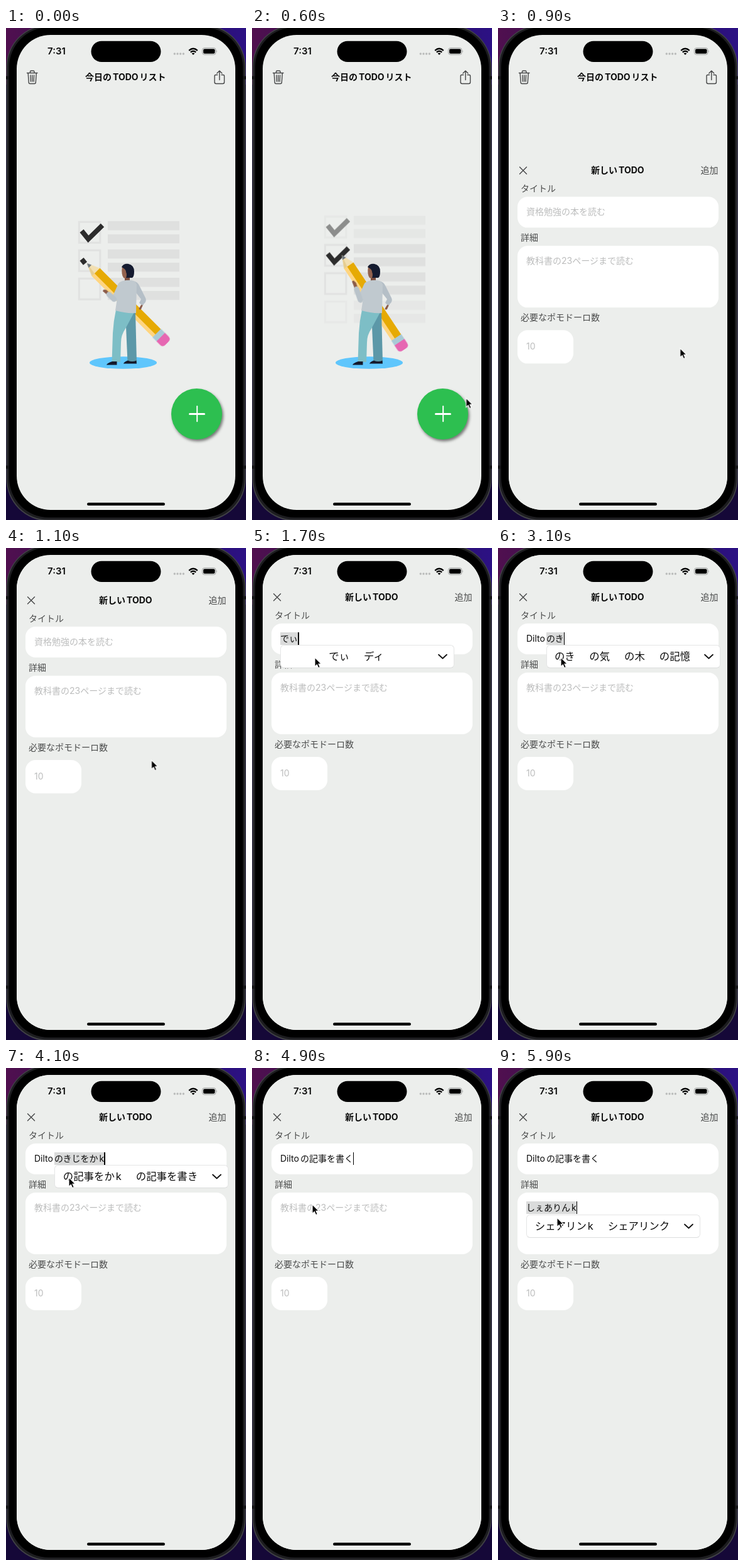
Recreate the animation shown at these times as an HTML page. Size 382 by 782 pixels, loop 6000 ms.

```html
<!DOCTYPE html>
<html lang="ja">
<head>
<meta charset="utf-8">
<title>TODO</title>
<style>
  html, body { margin: 0; width: 100%; height: 100%; overflow: hidden; background: #120732; }
  #stage { position: relative; width: 382px; height: 782px; overflow: hidden;
    font: 14px/20px Inter, "Noto Sans CJK JP", "Noto Sans CJK", sans-serif; color: #0c0c0c; }
  #stage svg { position: absolute; left: 0; top: 0; overflow: visible; }
  .screen { position: absolute; inset: 0; background: #eceeec;
    clip-path: inset(11px 17px 16px 17px round 54px); }
  .t { position: absolute; margin-top: -10px; white-space: nowrap; }
  .t i, .popup i { display: inline-block; width: 2px; }
  .head { font-weight: 700; }
  .label { left: 36px; color: #4b4c4c; }
  .hint { left: 45px; color: #bcbdbd; }
  .box { position: absolute; left: 31px; width: 320px; border-radius: 16px; background: #fff; }
  .line { fill: none; stroke: #454647; stroke-width: 1.4; stroke-linecap: round; stroke-linejoin: round; }

  .plus { position: absolute; left: 263px; top: 573px; width: 81px; height: 81px; border-radius: 50%;
    background: #2dbf50; box-shadow: 2px 3px 4px rgba(0, 0, 0, .5); }
  .plus::before, .plus::after { content: ""; position: absolute; left: 27.5px; top: 39.3px;
    width: 26px; height: 2.4px; border-radius: 2px; background: #fff; }
  .plus::after { transform: rotate(90deg); }

  .input { left: 45px; }
  .comp { display: inline-block; background: #dadbdb; vertical-align: top; }
  .caret { display: inline-block; width: 1.5px; height: 20px; margin-right: -2px;
    background: #000; vertical-align: top; }
  .popup { position: absolute; box-sizing: border-box; width: 276.5px; height: 37px; border-radius: 6px;
    border: 1px solid #e4e5e5; border-bottom-color: #dcdddd; background: #fff; font-size: 16.4px; }
  .words { position: absolute; left: 0; top: 7px; width: 240px; display: flex; gap: 23px;
    justify-content: center; white-space: nowrap; }
  .words.one { left: 21px; justify-content: flex-start; }

  .modal, .cursor, .rows, .out, .in, .draw, .pencil, .arm { animation: 6s linear infinite; }
  .modal { position: absolute; left: 0; top: 11px; width: 382px; height: 771px; background: #eceeec;
    animation-name: rise; }
  .modal > div { position: absolute; left: 0; top: -11px; }
  .cursor { animation-name: point; }
  .rows { animation-name: scroll; }
  .out { animation-name: out; }
  .in { animation-name: in; }
  .draw { animation-name: draw; stroke-dasharray: 1 2; }
  .pencil { animation-name: write; }
  .arm { animation-name: reach; }

  /* critically damped spring */
  @keyframes rise {
    0%, 12.5% { transform: translateY(755px); }
    13.33% { transform: translateY(556px); }
    14.17% { transform: translateY(306px); }
    15% { transform: translateY(150px); }
    15.83% { transform: translateY(69px); }
    16.67% { transform: translateY(30px); }
    17.5% { transform: translateY(13px); }
    18.33% { transform: translateY(5px); }
    20%, 100% { transform: none; }
  }
  @keyframes point {
    0%, 8.3% { transform: translate(372px, 574px); opacity: 0; }
    8.31% { transform: translate(372px, 574px); opacity: 1; }
    10% { transform: translate(341px, 588px); }
    11.67%, 13.33% { transform: translate(314px, 610px); }
    16.67% { transform: translate(266px, 410px); }
    18.33% { transform: translate(232px, 338px); }
    21.67% { transform: translate(140px, 190px); }
    23.33%, 25% { transform: translate(104px, 152px); }
    28.33%, 78.33% { transform: translate(100px, 174px); }
    83.33%, 100% { transform: translate(94px, 238px); opacity: 1; }
  }
  @keyframes scroll {
    0%, 8% { transform: none; animation-timing-function: ease-in-out; }
    14.67%, 100% { transform: translateY(-45px); }
  }
  @keyframes out { 0%, 8% { opacity: 1; } 12%, 100% { opacity: 0; } }
  @keyframes in { 0%, 8% { opacity: 0; } 12%, 100% { opacity: 1; } }
  @keyframes draw {
    0% { stroke-dashoffset: .82; }
    1.67% { stroke-dashoffset: .66; }
    5.83%, 100% { stroke-dashoffset: 0; }
  }
  @keyframes write {
    0% { transform: rotate(45deg); }
    1.67% { transform: rotate(43.2deg) translateX(7px); }
    5.83%, 7.5% { transform: rotate(62deg) translateX(3px); }
    10% { transform: rotate(56.5deg) translateX(-1px); }
    13.33%, 100% { transform: rotate(45deg) translateX(-9px); }
  }
  @keyframes reach {
    0% { transform: rotate(223deg); }
    1.67% { transform: rotate(220deg) scaleX(.95); }
    5.83%, 7.5% { transform: rotate(257deg) scaleX(1.4); }
    10% { transform: rotate(251deg) scaleX(1.4); }
    13.33%, 100% { transform: rotate(224deg) scaleX(1.1); }
  }
</style>
</head>
<body>
<div id="stage">
  <svg width="382" height="782">
    <defs>
      <linearGradient id="wall">
        <stop offset="0" stop-color="#50104f"/><stop offset=".5" stop-color="#2a0c55"/><stop offset="1" stop-color="#2c1184"/>
      </linearGradient>
    </defs>
    <rect width="382" height="782" fill="#150838"/>
    <rect width="382" height="90" fill="url(#wall)"/>
    <rect x=".5" y="-5" width="381" height="788.5" rx="67" fill="#424347"/>
    <rect x="2" y="-3.5" width="378" height="785" rx="65" fill="#1d1d20"/>
    <rect x="5" y="-1" width="372" height="779" rx="63"/>
    <path d="M0 79h5M0 698h5M377 79h5M377 698h5" stroke="#141416" stroke-width="5"/>
  </svg>

  <div class="screen">
    <svg width="382" height="782">
      <g class="line">
        <path d="M33.5 71.5H50M38.5 71v-1.5q0-1.5 1.5-1.5h3.5q1.5 0 1.5 1.5V71M35.2 72l1 14.5q.1 2 2 2h7.1q1.9 0 2-2l1-14.5M39 75l.4 10M41.8 75v10M44.6 75l-.4 10"/>
        <path d="M336.5 74.5h-2.5q-2 0-2 2v9.5q0 2.5 2.5 2.5h10.5q2.5 0 2.5-2.5v-9.5q0-2-2-2h-2.5M339.8 82.5V68M335.8 72l4-4 4 4"/>
      </g>
      <defs>
        <g id="row">
          <rect x="116.3" y="308.3" width="33.5" height="33" fill="none" stroke="#e1e2e1" stroke-width="3"/>
          <path d="M162 307h114v14.5H162zM162 328h114v14.3H162z" fill="#dfe0df"/>
        </g>
        <path id="tick" d="M120.5 322.5L131 335.5 153.5 313.5" pathLength="1" fill="none" stroke="#2c2c2c" stroke-width="7.8"/>
      </defs>
      <g class="rows">
        <g class="out"><use href="#row"/><use href="#tick"/></g>
        <use href="#row" y="45"/>
        <use href="#tick" y="45" class="draw"/>
        <use href="#row" y="90"/>
        <g class="in"><use href="#row" y="135"/></g>
      </g>
      <ellipse cx="186.5" cy="532" rx="53.5" ry="9.8" fill="#5fc6fc"/>
      <g transform="translate(196 441)">
        <g class="pencil">
          <path d="M-95 0L-75-9V9z" fill="#f2dfb2"/>
          <path d="M-95 0L-75 3V9z" fill="#e6cd90"/>
          <path d="M-95 0l7-3.2v6.4z" fill="#6c757c"/>
          <path d="M-75-9H62V3H-75z" fill="#e6aa04"/>
          <path d="M-75 3H62V9H-75z" fill="#ffd580"/>
          <path d="M62-9.5h9v19h-9z" fill="#a9cad6"/>
          <path d="M71-9.5h8q6 0 6 6v7q0 6-6 6h-8z" fill="#e667b2"/>
        </g>
      </g>
      <path d="M190 452L206 451 208 531H193.5z" fill="#5c98a8"/>
      <path d="M175 448L204 452 190 478Q183 488 183 500L182 531H168.5L170 485Q171 466 175 448z" fill="#7dbec6"/>
      <path d="M169 530h7.5v5.5H160q1-3 9-5.5zM194 528.5q7 3 13.5 0l.5 5H187q1-3 7-5z" fill="#14192b"/>
      <path d="M217 437l2 1-4 9q-3 2-3.5-1z" fill="#8b5b49"/>
      <path d="M202 402q8 1 11 9l9 18q2 4-1 8l-4 4-5-4 3-6-11-14z" fill="#b5bfc7"/>
      <path d="M189 394h8v9q-4 3-8 0z" fill="#7c4f40"/>
      <path d="M180 405q7-5 19-4 8 1 9 7l-1 45q-16 1-33-4l4-26z" fill="#c0c9cf"/>
      <path d="M185 379q8-5 10 2l-1 14q-3 4-7 2-4-6-2-18z" fill="#93624e"/>
      <path d="M184 380q3-6 11-5 9 2 9 12 0 8-3 10h-10q2-5 0-9 0-5-7-8z" fill="#151b30"/>
      <path d="M183 409L174 429" fill="none" stroke="#c0c9cf" stroke-width="10" stroke-linecap="round"/>
      <g transform="translate(172 431)">
        <g class="arm">
          <path d="M14-2.5L22-3 22.5 0 19 2.5H14z" fill="#8b5b49"/>
          <path d="M0 0H11" stroke="#b9c3ca" stroke-width="8.5" stroke-linecap="round"/>
        </g>
      </g>
    </svg>
    <div class="t head" style="left:126px;top:78px">今日のTODOリスト</div>
    <div class="plus"></div>

    <div class="modal"><div>
      <svg width="382" height="782">
        <path class="line" d="M34.5 72.7L45.5 83.7M45.5 72.7L34.5 83.7"/>
      </svg>
      <div class="t head" style="left:148px;top:78px">新しいTODO</div>
      <div class="t" style="left:322.5px;top:78px;color:#4b4c4c">追加</div>
      <div class="t label" style="top:107px">タイトル</div>
      <div class="box" style="top:120px;height:49px"></div>
      <div class="t label" style="top:185px">詳細</div>
      <div class="box" style="top:198px;height:97.5px"></div>
      <div class="t label" style="top:312px">必要なポモドーロ数</div>
      <div class="box" style="top:332px;height:53px;width:89px"></div>
      <div class="t hint" style="top:143.5px">資格勉強の本を読む</div>
      <div class="t hint" style="top:221.5px">教科書の23ページまで読む</div>
      <div class="t hint" style="top:358px">10</div>
      <div class="t input" style="top:144px"></div>
      <div class="t input" style="top:222px"></div>
      <div class="popup" hidden>
        <div class="words"></div>
        <svg width="276" height="36"><path d="M251 14.5l6.5 6 6.5-6" fill="none" stroke="#111" stroke-width="1.8" stroke-linecap="round" stroke-linejoin="round"/></svg>
      </div>
    </div></div>
  </div>

  <svg width="382" height="782">
    <rect x="135.5" y="20.7" width="111" height="33.3" rx="16.6"/>
    <g fill="#b9bbba"><circle cx="268.3" cy="41" r="1.7"/><circle cx="273" cy="41" r="1.7"/><circle cx="277.7" cy="41" r="1.7"/><circle cx="282.4" cy="41" r="1.7"/></g>
    <path d="M291.2 35.8q6.8-6 13.6 0M293.8 38.6q4.2-3.6 8.4 0" fill="none" stroke="#000" stroke-width="2.3"/>
    <path d="M295.6 40.4q2.4-2 4.8 0L298 42.8z"/>
    <rect x="312.5" y="31.7" width="21.5" height="10.6" rx="3.3" fill="none" stroke="#9c9e9d"/>
    <rect x="314" y="33.2" width="18.5" height="7.6" rx="2"/>
    <path d="M335.2 35.3q1.6 1.7 0 3.4z" fill="#9c9e9d"/>
    <rect x="129" y="754.5" width="124" height="4.5" rx="2.25"/>
  </svg>
  <div class="t" style="left:66px;top:37px;font-size:15px;font-weight:600">7:31</div>
  <svg width="382" height="782">
    <g class="cursor">
      <path d="M0 0V14.5L3.4 11.4 5.7 16.6 8.3 15.5 6 10.4H10.4z" stroke="#fff" stroke-width="1.1"/>
    </g>
  </svg>
</div>

<script>
  const $$ = q => [...document.querySelectorAll(q)];
  const inputs = $$('.input'), hints = $$('.hint');
  const [modal] = $$('.modal'), [popup] = $$('.popup'), [words] = $$('.words');
  const clock = modal.getAnimations()[0];
  const LEAD = 50; // switch early enough that each state is on screen at its time

  // thin gap where Latin letters meet kana or kanji
  const space = s => s.replace(/(?<=[A-Za-z])(?=[^\w\s])|(?<=[^\w\s])(?=[A-Za-z])/g, '<i></i>');
  $$('.head').forEach(el => el.innerHTML = space(el.textContent));

  const name = 'Dilto', title = name + 'の記事を書く';
  // [time, field, committed text, text being composed, candidates]
  const steps = [
    [0, -1, '', '', ''],
    [1500, 0, '', '', ''],
    [1600, 0, '', 'd', ''],
    [1700, 0, '', 'でぃ', 'でぃ ディ'],
    [1800, 0, '', 'でぃr', 'でぃr ディr'],
    [1900, 0, '', 'でぃる', 'でぃる ディル'],
    [2100, 0, '', 'でぃるt', 'でぃるt ディルt'],
    [2200, 0, '', 'でぃると', name],
    [2400, 0, '', name, name],
    [2600, 0, name, '', ''],
    [2900, 0, name, 'n', ''],
    [3000, 0, name, 'の', 'の 野 ノ 之'],
    [3100, 0, name, 'のき', 'のき の気 の木 の記憶'],
    [3300, 0, name, 'のきj', 'の木j の気j'],
    [3500, 0, name, 'のきじ', 'の記事 の生地'],
    [3600, 0, name, 'のきじw', 'の記事w の生地w'],
    [3700, 0, name, 'のきじを', 'の記事を の生地を'],
    [3900, 0, name, 'のきじをk', 'の記事をk の生地をk'],
    [4000, 0, name, 'のきじをか', 'の記事をか の記事を書き'],
    [4100, 0, name, 'のきじをかk', 'の記事をかk の記事を書き'],
    [4200, 0, name, 'のきじをかく', 'の記事を書く の記事を描く'],
    [4500, 0, name, 'の記事を書く', ''],
    [4700, 0, title, '', ''],
    [5000, 1, '', '', ''],
    [5100, 1, '', 's', ''],
    [5200, 1, '', 'しぇ', 'しぇ シェ'],
    [5400, 1, '', 'しぇあ', 'シェア しぇあ'],
    [5500, 1, '', 'しぇあr', 'シェアr しぇあr'],
    [5600, 1, '', 'しぇあり', 'シェアリ シェアリング'],
    [5800, 1, '', 'しぇありn', 'シェアリn シェアリング'],
    [5900, 1, '', 'しぇありんk', 'シェアリンk シェアリンク']
  ];

  function fill(n, done, comp, caret) {
    hints[n].hidden = !!(done || comp);
    inputs[n].innerHTML = space(done) + (done && comp ? '<i></i>' : '') +
      (comp && `<span class="comp">${space(comp)}</span>`) +
      (caret ? '<span class="caret"></span>' : '');
  }

  function show([, field, done, comp, list], caret) {
    fill(0, field === 1 ? title : done, field === 0 ? comp : '', caret && field === 0);
    fill(1, '', field === 1 ? comp : '', caret && field === 1);
    popup.hidden = !list;
    if (!list) return;
    const items = list.split(' ');
    words.className = items.length > 1 ? 'words' : 'words one';
    words.innerHTML = items.map(w => `<span>${space(w)}</span>`).join('');
    popup.style.left = 45 + inputs[field].querySelector('.comp').offsetLeft + 'px';
    popup.style.top = [154, 232.5][field] + 'px';
  }

  let last = '';
  function tick() {
    const t = (clock.currentTime || 0) % 6000 + LEAD;
    const n = steps.findLastIndex(s => s[0] <= t);
    const caret = (t + 300) % 1000 < 500;
    const key = n + '/' + caret;
    if (key !== last) show(steps[n], caret);
    last = key;
    requestAnimationFrame(tick);
  }
  tick();
</script>
</body>
</html>
```
